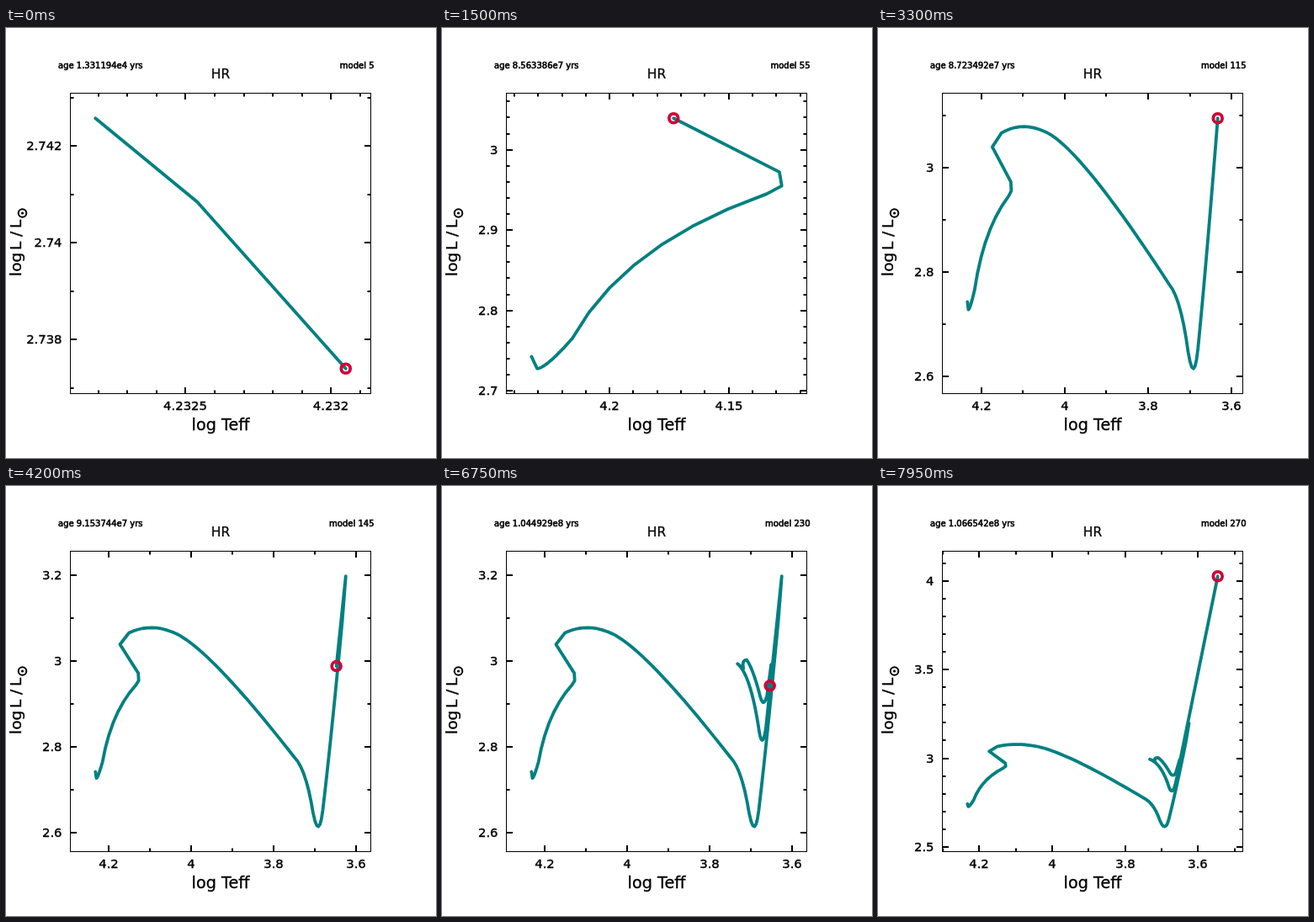
An HTML page with a canvas for the animation above (8 s loop, 511x511 px).

```html
<!DOCTYPE html>
<html lang="en">
<head>
<meta charset="utf-8">
<title>HR track</title>
<style>
html, body { margin: 0; width: 100%; height: 100%; overflow: hidden; background: #fff; }
canvas { display: block; width: 100vw; height: 100vh; }
</style>
</head>
<body>
<canvas id="plot" width="511" height="511"></canvas>
<script>
const LOOP = 8000, STEP = 150, MODELS_PER_STEP = 5;
const BOX = { x: 76.5, y: 77.5, size: 357 };
const TEAL = '#008080', RED = '#d00038';
const ctx = document.getElementById('plot').getContext('2d');

// The star's path: one point (log Teff, log L) per model
const track = [[4.23281, 2.74257]];

// Quadratic curve from the last point to `end`, reached at model `last`
function curve(last, control, end, power = 1) {
  const first = track.length, start = track[first - 1];
  for (let n = first + 1; n <= last; n++) {
    const u = ((n - first) / (last - first)) ** power, v = 1 - u;
    track.push(start.map((s, k) => v * v * s + 2 * u * v * control[k] + u * u * end[k]));
  }
}

function straight(last, end) {
  const start = track[track.length - 1];
  curve(last, start.map((s, k) => (s + end[k]) / 2), end);
}

// Settling and main sequence
straight(2, [4.23246, 2.74084]);
straight(5, [4.23195, 2.7374]);
straight(20, [4.2304, 2.7277]);
curve(40, [4.2265, 2.7285], [4.2156, 2.7653], 4);
curve(47, [4.194, 2.8824], [4.134, 2.9451]);
// Hook
straight(48, [4.1277, 2.955]);
straight(54, [4.1287, 2.9723]);
straight(55, [4.1731, 3.0392]);
straight(56, [4.1512, 3.0661]);
// Crossing to the giant branch
curve(65, [4.1024, 3.0885], [4.0504, 3.0696]);
curve(90, [3.9691, 3.046], [3.7496, 2.7764]);
curve(96, [3.7248, 2.7528], [3.7087, 2.6723]);
curve(103, [3.6915, 2.5676], [3.6804, 2.653]);
curve(115, [3.6603, 2.8156], [3.633, 3.0942]);
straight(130, [3.6246, 3.198]);
// First loop
straight(155, [3.6626, 2.849]);
curve(165, [3.6708, 2.7922], [3.6789, 2.8333]);
curve(180, [3.6994, 2.9686], [3.7321, 2.9941]);
straight(185, [3.7178, 2.9833]);
// Second loop and final ascent
curve(195, [3.7219, 3.0029], [3.7096, 3.0029]);
curve(209, [3.6943, 2.9824], [3.6769, 2.9176]);
curve(214, [3.6687, 2.8892], [3.6605, 2.9196]);
straight(222, [3.6503, 2.9922]);
straight(230, [3.6534, 2.943]);
straight(270, [3.5457, 4.026]);

// Age grows exponentially between a few known models
const ages = [
  [5, 1.331194e4], [55, 8.563386e7], [90, 8.697596e7], [115, 8.723492e7],
  [185, 9.760602e7], [230, 1.044929e8], [270, 1.066542e8]
];
function ageOf(model) {
  const i = Math.max(1, ages.findIndex(([n]) => n >= model));
  const [n0, a0] = ages[i - 1], [n1, a1] = ages[i];
  return a0 * (a1 / a0) ** ((model - n0) / (n1 - n0));
}

// Range of the values with a tenth of it added at both ends
function padded(values) {
  const lo = Math.min(...values), hi = Math.max(...values), pad = (hi - lo) / 10;
  return { lo: lo - pad, hi: hi + pad, span: hi - lo + 2 * pad };
}

// Next round number (1, 2 or 5) above a fifth of the span
function tickStep(span) {
  const want = span / 5, power = 10 ** Math.floor(Math.log10(want));
  const m = [2, 5, 10].find(v => v * power >= want);
  return { major: m * power, parts: m === 2 ? 2 : 5 };
}

function eachTick(range, draw) {
  const { major, parts } = tickStep(range.span), minor = major / parts;
  for (let k = Math.ceil(range.lo / minor); k * minor <= range.hi; k++) {
    draw(k * minor, k % parts === 0);
  }
}

function text(str, x, y, size, align = 'left', weight = 0.4) {
  ctx.font = `${size}px "DejaVu Sans", Inter, sans-serif`;
  ctx.textAlign = align;
  ctx.lineWidth = weight;
  ctx.fillText(str, x, y);
  ctx.strokeText(str, x, y);
}

function line(x1, y1, x2, y2) {
  ctx.lineWidth = 2;
  ctx.beginPath();
  ctx.moveTo(x1, y1);
  ctx.lineTo(x2, y2);
  ctx.stroke();
}

function circle(x, y, r, width) {
  ctx.lineWidth = width;
  ctx.beginPath();
  ctx.arc(x, y, r, 0, 2 * Math.PI);
  ctx.stroke();
}

function axes(tRange, lRange, px, py) {
  const { x, y, size } = BOX, right = x + size, bottom = y + size;
  const label = v => String(Number(v.toFixed(6)));
  ctx.lineWidth = 1;
  ctx.strokeRect(x, y, size, size);
  eachTick(tRange, (v, major) => {
    const at = Math.round(px(v)), len = major ? 7.5 : 4;
    line(at, bottom, at, bottom - len);
    line(at, y, at, y + len);
    if (major) text(label(v), at, 453.5, 14.8, 'center');
  });
  eachTick(lRange, (v, major) => {
    const at = Math.round(py(v)), len = major ? 7.5 : 4;
    line(x, at, x + len, at);
    line(right, at, right - len, at);
    if (major) text(label(v), 66.5, at + 5, 14.8, 'right');
  });
}

function captions(model) {
  const age = ageOf(model).toExponential(6).replace('+', '');
  text(`age ${age} yrs`, 62, 47.5, 10, 'left', 0.6);
  text(`model ${model}`, 437.5, 47.5, 10, 'right', 0.6);
  text('HR', 255, 60, 15.5, 'center', 0.2);
  text('log Teff', 255, 477.5, 19.2, 'center', 0.3);
  ctx.save();
  ctx.rotate(-Math.PI / 2);
  [['log', 295], ['L', 264], ['/', 248], ['L', 238]].forEach(([s, y]) => text(s, -y, 18, 18.5, 'left', 0.3));
  ctx.restore();
  circle(19.5, 220, 4.8, 2);
  circle(19.5, 220, 0.8, 1.6);
}

function draw(model) {
  const seen = track.slice(0, model);
  const tRange = padded(seen.map(p => p[0])), lRange = padded(seen.map(p => p[1]));
  const px = t => BOX.x + (tRange.hi - t) / tRange.span * BOX.size;
  const py = l => BOX.y + (lRange.hi - l) / lRange.span * BOX.size;

  ctx.fillStyle = '#fff';
  ctx.fillRect(0, 0, 511, 511);
  ctx.fillStyle = ctx.strokeStyle = '#000';
  ctx.lineCap = 'butt';
  ctx.lineJoin = 'miter';
  axes(tRange, lRange, px, py);
  captions(model);

  ctx.strokeStyle = TEAL;
  ctx.lineWidth = 3.8;
  ctx.lineJoin = ctx.lineCap = 'round';
  ctx.beginPath();
  seen.forEach(([t, l]) => ctx.lineTo(px(t), py(l)));
  ctx.stroke();

  const [t, l] = seen[model - 1];
  ctx.strokeStyle = RED;
  circle(px(t), py(l), 5.4, 3.8);
}

let shown = 0;
function tick() {
  const step = Math.floor(performance.now() % LOOP / STEP);
  const model = MODELS_PER_STEP * (step + 1);
  if (model !== shown) draw(shown = model);
  requestAnimationFrame(tick);
}
tick();
</script>
</body>
</html>
```
